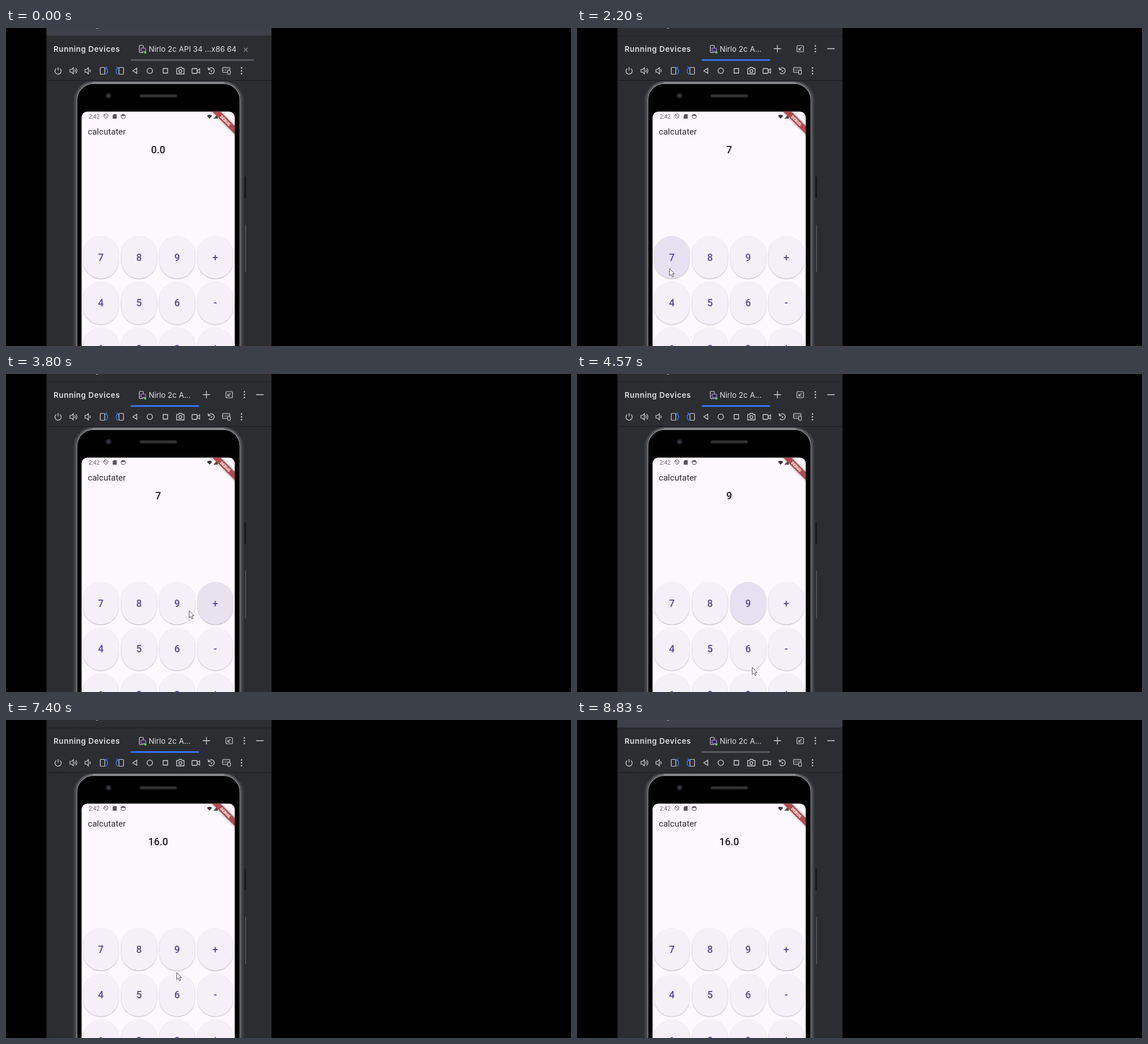
An HTML page with a canvas that plays this animation: 998x561 px, repeating every 8860 ms.

```html
<!DOCTYPE html>
<html lang="en">
<head>
<meta charset="utf-8">
<title>Calculator demo</title>
<style>
  html, body { margin: 0; width: 100%; height: 100%; overflow: hidden; background: #000; }
  canvas { display: block; width: 998px; height: 561px; }
</style>
</head>
<body>
<canvas id="stage" width="998" height="561"></canvas>
<script>
const ctx = document.getElementById('stage').getContext('2d');
const LOOP = 8860;
const PANEL = '#2b2d30', ICON = '#ced0d6', BLUE = '#3574f0', SCREEN = '#fdf8fd';
const KEYS = ['789+', '456-', '123*'];

// Pointer stops: time, x, y. Each path starts and ends outside the panel or at rest.
const PATHS = [
  [[60, 335, 565], [300, 260, 440], [550, 170, 330], [800, 60, 290]],
  [[1480, 62, 434], [1820, 160, 424], [2150, 160, 424], [2800, 356, 414], [3480, 356, 414],
   [4020, 304, 418], [4330, 304, 418], [4570, 309, 517], [4690, 318, 566]],
  [[6700, 400, 565], [6900, 446, 530], [7150, 380, 485], [7400, 301, 445], [7530, 299, 438],
   [8300, 299, 438], [8600, 330, 566]]
];

// Presses: column of the top key row, start time.
const PRESSES = [[0, 1900], [3, 3400], [2, 4200]];

const clamp = v => Math.max(0, Math.min(1, v));
const smooth = v => v * v * (3 - 2 * v);

function box(x, y, w, h, r, fill, stroke, lw = 1) {
  ctx.beginPath();
  ctx.roundRect(x, y, w, h, r);
  if (fill) { ctx.fillStyle = fill; ctx.fill(); }
  if (stroke) { ctx.strokeStyle = stroke; ctx.lineWidth = lw; ctx.stroke(); }
}

function line(points, color = ICON, lw = 1.3, close = false, fill = null) {
  ctx.beginPath();
  points.forEach(([x, y], i) => i ? ctx.lineTo(x, y) : ctx.moveTo(x, y));
  if (close) ctx.closePath();
  if (fill) { ctx.fillStyle = fill; ctx.fill(); }
  if (color) { ctx.strokeStyle = color; ctx.lineWidth = lw; ctx.stroke(); }
}

function arc(x, y, r, a = 0, b = Math.PI * 2, color = ICON, lw = 1.3) {
  ctx.beginPath();
  ctx.arc(x, y, r, a, b);
  ctx.strokeStyle = color;
  ctx.lineWidth = lw;
  ctx.stroke();
}

function dot(x, y, r, color) {
  ctx.beginPath();
  ctx.arc(x, y, r, 0, Math.PI * 2);
  ctx.fillStyle = color;
  ctx.fill();
}

function text(str, x, y, font, color, align = 'left', spacing = 0) {
  ctx.font = font;
  ctx.fillStyle = color;
  ctx.textAlign = align;
  ctx.letterSpacing = spacing + 'px';
  ctx.fillText(str, x, y);
}

function kebab(x, y) {
  for (let i = -1; i < 2; i++) dot(x, y + i * 5, 1.3, ICON);
}

function header(active, open) {
  box(71, 0, 398, 561, 0, PANEL);
  if (!active) box(71, 0, 398, 14, 0, '#3e404b');
  box(71, 13.5, 398, 1, 0, '#222327');
  box(159, 0, 4, 1, 0, '#a6a7ac');

  text('Running Devices', 84, 42, '600 13.4px Inter, sans-serif', '#dfe1e5', 'left', 0.6);
  box(235.5, 30.5, 7, 13, 1.5, null, ICON, 1.2);
  box(238.5, 35.5, 8, 6, 1, PANEL, '#9d6ad8', 1.5);
  dot(246, 43, 2.2, '#4fd14f');
  text(open ? 'Nirlo 2c API 34 ...x86 64' : 'Nirlo 2c A...', 252, 42,
    '13.4px Inter, sans-serif', '#dfe1e5');
  box(220, 55, open ? 218 : 121, 3, 1.5, active ? BLUE : '#575a61');

  if (open) {
    line([[420, 35], [427, 42]], '#8c8f96', 1.1);
    line([[427, 35], [420, 42]], '#8c8f96', 1.1);
  } else {
    line([[347.5, 36.5], [360.5, 36.5]]);
    line([[354, 30], [354, 43]]);
    box(388.5, 31, 11.5, 11, 2, null, ICON, 1.2);
    line([[396.5, 34], [392, 38.7]], ICON, 1.2);
    line([[392, 35], [392, 39], [396, 39]], ICON, 1.2);
    kebab(421, 36.5);
    line([[442, 36.5], [455, 36.5]]);
  }
}

function speaker(x, waves) {
  line([[x, 73], [x + 3, 73], [x + 6, 70], [x + 6, 81], [x + 3, 78], [x, 78]], ICON, 1.2, true);
  for (let i = 0; i < waves; i++) arc(x + 6, 75.5, 3.2 + i * 3, -0.85, 0.85, ICON, 1.2);
}

function toolbar() {
  arc(92, 76, 5.5, -0.95, Math.PI + 0.95);
  line([[92, 69], [92, 75]]);
  speaker(113, 2);
  speaker(139.5, 1);

  box(166.5, 69.5, 8, 12, 1, null, ICON, 1.2);
  arc(173, 76, 6.5, -1.1, 1.1, BLUE, 1.6);
  line([[179, 68], [175.5, 70.5], [179, 73]], BLUE, 1.4);
  box(199.5, 69.5, 8, 12, 1, null, ICON, 1.2);
  arc(201, 76, 6.5, Math.PI - 1.1, Math.PI + 1.1, BLUE, 1.6);
  line([[195, 68], [198.5, 70.5], [195, 73]], BLUE, 1.4);

  line([[231, 71], [231, 80], [224, 75.5]], ICON, 1.3, true);
  arc(254, 75.5, 4.8);
  box(277.5, 71.5, 8, 8, 0, null, ICON, 1.3);

  line([[301.5, 71.5], [304.5, 71.5], [306, 69.5], [310, 69.5], [311.5, 71.5], [314.5, 71.5],
    [314.5, 81], [301.5, 81]], ICON, 1.3, true);
  arc(308, 76, 2.6);
  box(328.5, 71.5, 9, 8.5, 1, null, ICON, 1.3);
  line([[338, 75], [342, 72], [342, 79.5], [338, 77]], ICON, 1.2);

  arc(362.5, 75.5, 5.3, -2.7, 2.5);
  line([[357, 69.5], [357.5, 73.5], [361.5, 73.5]]);
  line([[362.5, 78], [362.5, 75.5], [365, 75.5]], ICON, 1.2);

  box(382.5, 69.5, 13, 9, 1.5, null, ICON, 1.2);
  for (let i = 0; i < 4; i++) {
    dot(385 + i * 2.7, 72.3, 0.7, ICON);
    if (i < 3) dot(385 + i * 2.7, 75.3, 0.7, ICON);
  }
  box(391.5, 74.5, 5, 7.5, 2.4, PANEL, ICON, 1.1);
  kebab(416, 75.5);
  box(71, 92, 398, 1, 0, '#1b1c1f');
}

function phone() {
  box(421, 262, 3, 38, 1, '#17181a');
  box(422.5, 347, 1.2, 84, 0, '#66686a');
  box(119.5, 94.5, 299.5, 520, 34, '#17181b', '#505257', 1);
  box(122, 96, 294.5, 520, 32, '#25262a', '#737579', 1.4);
  box(125, 98, 288.5, 520, 29, '#000', '#94969a', 1.6);
  ctx.globalAlpha = 0.7;
  line([[153, 96.5], [386, 96.5]], '#b9bbbe', 1.4);
  ctx.globalAlpha = 1;
  dot(181, 119.5, 5, '#202126');
  dot(181, 119.5, 2.5, '#3a3b45');
  box(236, 117, 66, 5.5, 2.7, '#2c2c2d');
  for (let x = 239; x < 300; x += 3) box(x, 119, 1.2, 1.5, 0, '#4a4a4b');
}

function statusBar() {
  const gray = '#55525a';
  text('2:42', 146, 160, '10px Roboto, sans-serif', '#625f66');
  line([[173, 153], [176.5, 151.5], [180, 153], [180, 156], [176.5, 160], [173, 156]], gray, 1, true);
  line([[173.5, 152.5], [179.5, 158.5]], gray, 1);
  line([[190.5, 152], [195.5, 152], [195.5, 160], [188.5, 160], [188.5, 154]], null, 0, true, gray);
  arc(207, 156, 3.8, 0, Math.PI * 2, gray, 1.1);
  box(204, 153, 6, 2, 0.5, gray);
  ctx.beginPath();
  ctx.moveTo(359.5, 160);
  ctx.arc(359.5, 160, 7, -2.3, -0.84);
  ctx.closePath();
  ctx.fillStyle = '#37343b';
  ctx.fill();
  line([[374, 152], [374, 160], [366, 160]], null, 0, true, gray);
  box(378.5, 152.5, 5.5, 8, 1, '#37343b');
  box(380, 151.5, 2.5, 1.5, 0, '#37343b');
}

function banner() {
  ctx.save();
  ctx.translate(387.5, 163.5);
  ctx.rotate(Math.PI / 4);
  ctx.shadowColor = 'rgba(0,0,0,.45)';
  ctx.shadowBlur = 4;
  box(-40, -5, 80, 10, 0, '#b04b4c');
  ctx.shadowBlur = 0;
  text('DEBUG', 0, 2.5, '900 7px Roboto, sans-serif', '#fff', 'center');
  ctx.restore();
}

function key(label, x, y) {
  ctx.save();
  ctx.shadowColor = 'rgba(60,50,70,.4)';
  ctx.shadowBlur = 1.5;
  ctx.shadowOffsetY = 0.8;
  box(x - 31.5, y - 37.5, 63, 75, 31.5, '#f5f0f8');
  ctx.restore();
  text(label, x, y + 6, '500 17.5px Roboto, sans-serif', '#5c489f', 'center');
}

// The ink spreads from the pressed point, then fades.
function ripple(col, age) {
  if (age < 0 || age > 620) return;
  const x = 167.5 + col * 67.4, y = 404.5;
  ctx.save();
  ctx.beginPath();
  ctx.roundRect(x - 31.5, y - 37.5, 63, 75, 31.5);
  ctx.clip();
  ctx.globalAlpha = clamp(age / 80) * clamp((620 - age) / 220) * 0.1;
  dot(x, y + 10 * (1 - clamp(age / 250)), 8 + 48 * smooth(clamp(age / 250)), '#6750a4');
  ctx.restore();
}

function app(t) {
  const value = t < 1970 ? '0.0' : t < 4300 ? '7' : t < 5600 ? '9' : '16.0';
  ctx.save();
  ctx.beginPath();
  ctx.roundRect(133.5, 147.5, 270.5, 440, 10);
  ctx.fillStyle = SCREEN;
  ctx.fill();
  ctx.clip();
  statusBar();
  text('calcutater', 144.5, 188, '15.1px Roboto, sans-serif', '#29272d');
  text(value, 268.7, 220.5, '500 17.7px Roboto, sans-serif', '#1d1b20', 'center');
  KEYS.forEach((row, r) => [...row].forEach((label, c) => key(label, 167.5 + c * 67.4, 404.5 + r * 80.9)));
  PRESSES.forEach(([col, start]) => ripple(col, t - start));
  banner();
  ctx.restore();
}

function pointer(t) {
  const path = PATHS.find(p => t >= p[0][0] && t < p[p.length - 1][0]);
  if (!path) return;
  const i = path.findIndex(p => p[0] > t);
  const [t0, x0, y0] = path[i - 1], [t1, x1, y1] = path[i];
  const k = smooth((t - t0) / (t1 - t0));
  ctx.save();
  ctx.translate(Math.round(x0 + (x1 - x0) * k), Math.round(y0 + (y1 - y0) * k));
  line([[0.5, 0.5], [0.5, 13], [3.3, 10.4], [5.3, 15.2], [7.5, 14.2], [5.5, 9.6], [9, 9.4]],
    '#55535a', 1, true, '#fff');
  ctx.restore();
}

function draw(t) {
  ctx.fillStyle = '#000';
  ctx.fillRect(0, 0, 998, 561);
  ctx.save();
  ctx.beginPath();
  ctx.rect(71.5, 0, 397.5, 561);
  ctx.clip();
  header(t >= 1900 && t < 8600, t < 130);
  toolbar();
  phone();
  app(t);
  pointer(t);
  ctx.restore();
}

const start = performance.now();
function tick() {
  draw((performance.now() - start) % LOOP);
  requestAnimationFrame(tick);
}
tick();
</script>
</body>
</html>
```
